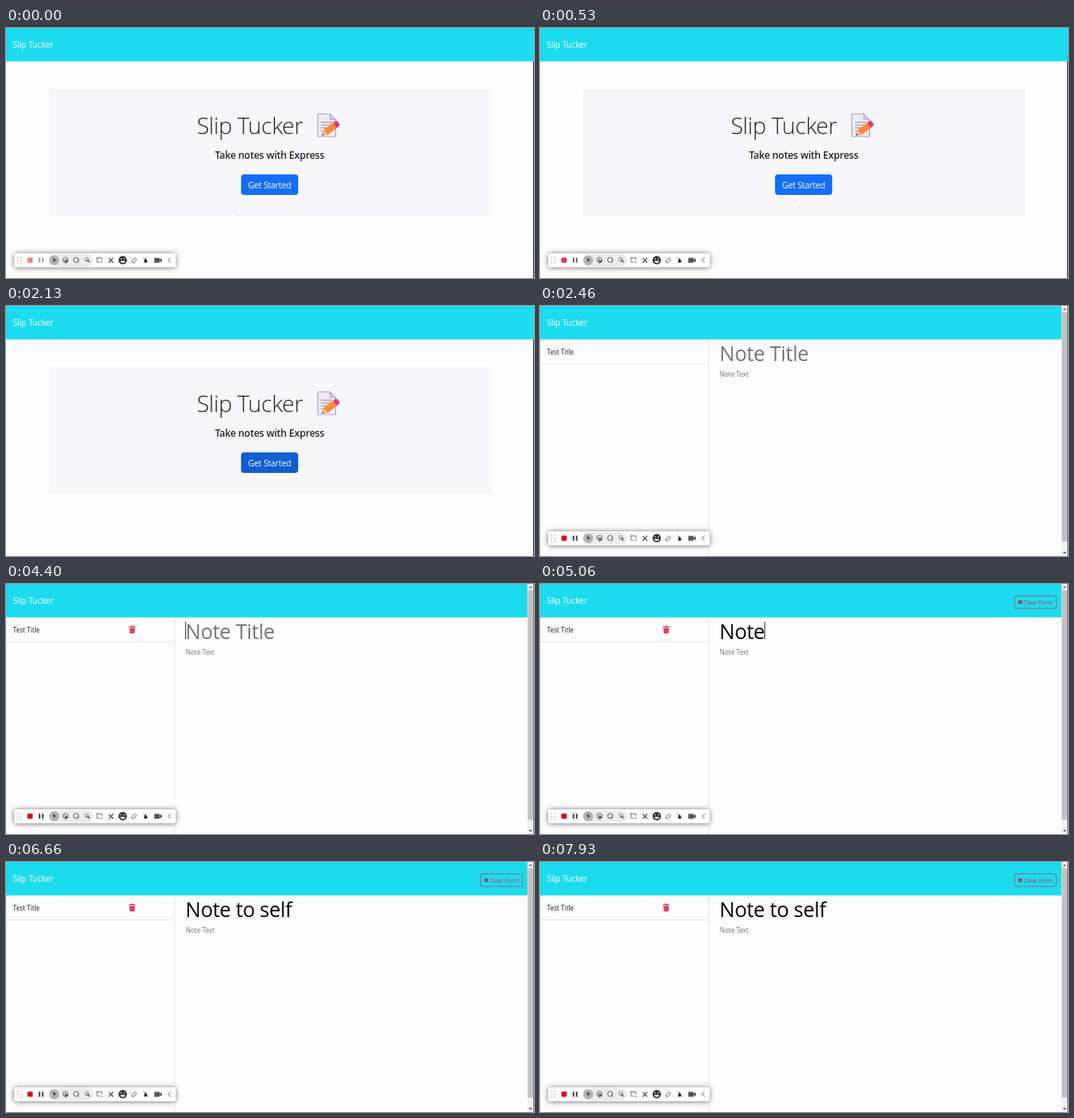
These frames come from a looping animation (640x304 px, 8 s). An HTML page:

```html
<!DOCTYPE html>
<html lang="en">
<head>
<meta charset="utf-8">
<title>Slip Tucker</title>
<style>
html, body { margin: 0; width: 100%; height: 100%; overflow: hidden; background: #fdfdfd; }
svg { display: block; width: 100vw; height: 100vh; }
text { font-family: "Open Sans", "Noto Sans", sans-serif; letter-spacing: -.013em; white-space: pre; }
.line { fill: none; stroke: #444; stroke-width: .8; stroke-linecap: round; stroke-linejoin: round; }
</style>
</head>
<body>
<svg viewBox="0 0 640 304">
  <defs>
    <filter id="shadow" x="-10%" y="-100%" width="120%" height="300%">
      <feDropShadow dx="0" dy="0.5" stdDeviation="3" flood-opacity=".6"/>
    </filter>
  </defs>
  <rect width="640" height="304" fill="#fdfdfd"/>
  <rect width="640" height="40.6" fill="#1cdbef"/>
  <text x="8.3" y="24.4" font-size="10.15" fill="#fff">Slip Tucker</text>

  <g id="home">
    <rect id="hero" x="51.7" y="74" width="536.2" height="154" fill="#f7f7fb"/>
    <text x="295.5" y="129.3" font-size="27.7" font-weight="300" text-anchor="middle" fill="#212529">Slip Tucker</text>
    <g stroke-linejoin="round">
      <path d="M378 104.5h14.5l7 7v20.5h-21.5z" fill="#f0ecf6" stroke="#b0a5bc" stroke-width="1.2"/>
      <path d="M392.5 104.5v7h7z" fill="#d5cddf" stroke="#b0a5bc" stroke-width=".8"/>
      <path d="M381.5 114.5h14m-14 3.5h13m-13 3.5h8m-8 3.5h4" stroke="#9a8fa8"/>
      <path d="M383 130.5l2-6.6 12.4-9.3 4.7 6.2-12.6 9.3z" fill="#ff8a34"/>
      <path d="M383 130.5l2-6.6 4.5 6.2z" fill="#fbc08c"/>
      <path d="M383 130.5l.8-2.4 1.6 2.2z" fill="#444"/>
      <path d="M396.6 115.2l2.8-2.1q1.4-1 2.4.4l2.4 3.2q1 1.4-.4 2.4l-2.8 2.1z" fill="#e8317c"/>
    </g>
    <text x="319.5" y="159" font-size="11.85" font-weight="600" text-anchor="middle" fill="#212529">Take notes with Express</text>
    <rect id="start" x="284.9" y="178" width="69.3" height="25" rx="3.7"/>
    <text x="319.5" y="194.6" font-size="10.15" text-anchor="middle" fill="#fff">Get Started</text>
    <path id="mouse" d="M0 0v3l1-.8z" fill="#999"/>
    <rect x="639" y="40.6" width="1" height="264" fill="#333"/>
  </g>

  <g id="notes">
    <path d="M.5 41v263M204.5 41v263M0 70.3h204.5" stroke="#e3e4e6" stroke-width=".9"/>
    <text x="8.5" y="58.9" font-size="8.15" fill="#212529">Test Title</text>
    <path id="trash" d="M149 51.6h2.4l.6-.8h2l.6.8h2.4v1.2h-8zm.6 1.8h6.8l-.5 6.7h-5.8zm1.6 1v4.7m1.8-4.7v4.7m1.8-4.7v4.7" fill="#d3304c" stroke="#f0a0ac" stroke-width=".35"/>
    <text id="title" x="217.6" y="66.8" font-size="24.7"></text>
    <rect id="caret" y="46" width=".9" height="21" fill="#222"/>
    <text x="217.8" y="86" font-size="8.15" fill="#757575">Note Text</text>
    <g id="clear">
      <rect x="575.3" y="14.3" width="50.6" height="15.4" rx="2" fill="none" stroke="#a8505f" stroke-width=".8"/>
      <path d="M580.2 20.1l4 4m0-4l-4 4" stroke="#b52b40" stroke-width="1.7"/>
      <text x="586.2" y="25" font-size="7.05" fill="#c5334a">Clear Form</text>
    </g>
    <rect x="632" width="8" height="304" fill="#f1f1f1"/>
    <rect x="632.5" y="7.5" width="6.5" height="279" fill="#c1c1c1"/>
    <path d="M633.8 4.8l2-2.4 2 2.4zM633.8 299l2 2.4 2-2.4z" fill="#555"/>
    <rect x="639.3" width=".7" height="304" fill="#555"/>
  </g>

  <g id="bar">
    <rect x="10" y="274" width="195.5" height="16.8" rx="2.5" fill="#fff" filter="url(#shadow)"/>
    <path d="M14 279h0m4 0h0m-4 3.5h0m4 0h0m-4 3.5h0m4 0h0" stroke="#999" stroke-width="1.4" stroke-linecap="round"/>
    <g id="rec">
      <rect x="26" y="279.2" width="6.4" height="6.4" rx=".8" fill="#e0001b"/>
      <path d="M40.6 279.2v6.4m3.9 0v-6.4" stroke="#333" stroke-width="1.8"/>
    </g>
    <rect x="52.3" y="276" width="52.6" height="12.8" rx="6.4" fill="#ededed" stroke="#d2d2d2" stroke-width=".6"/>
    <circle cx="58.5" cy="282.4" r="6" fill="#b4b4b4"/>
    <path d="M56.4 279l5 3.6-2.2.4-.9 2.3z" fill="#444"/>
    <g class="line">
      <circle cx="72" cy="282" r="3.1"/><path d="M71.2 281.2l4.2 3-2 .4-.8 1.6z" fill="#444" stroke-width=".4"/>
      <circle cx="85" cy="282" r="3.1"/><path d="M86.3 284l1.6 1.4"/>
      <circle cx="98" cy="281.6" r="2.4" stroke-dasharray="1 1.2"/><path d="M98.3 282l2.8 2.8" stroke-width="1.2"/>
      <path d="M110.3 279.5h5.8v3m-5.8-3v5.2h3" stroke-dasharray="1.2 1"/><path d="M115 285h1.8"/>
      <path d="M125 285l4.6-5.2m-4.6.4l1.4 1.4m1.6 1.7l1.7 1.7" stroke-width="1.2"/>
      <path d="M152.6 283.5l3.6-4 2.2 2-3.5 3.8h-1.2z"/>
      <path d="M167 279.4l4.4 5.4"/>
      <path d="M199.2 279.6l-2.6 2.7 2.6 2.7"/>
    </g>
    <circle cx="141.5" cy="282.3" r="5.1" fill="#333"/>
    <path d="M139.6 280.8h0m3.8 0h0" stroke="#fff" stroke-width="1.5" stroke-linecap="round"/>
    <path d="M138.7 283.2h5.6a2.8 2.4 0 0 1-5.6 0z" fill="#fff"/>
    <path d="M169.2 280q4 5.4 0 5.4t0-5.4z" fill="#222"/>
    <path d="M179.7 279.5h6.5v2l2.6-1.6v5.2l-2.6-1.6v2h-6.5z" fill="#555"/>
  </g>
</svg>
<script>
const el = id => document.getElementById(id);
const show = (id, on) => el(id).style.display = on ? "" : "none";
const ramp = (t, a, b) => Math.min(1, Math.max(0, (t - a) / (b - a)));
const mix = (a, b, k) => `rgb(${a.map((v, i) => Math.round(v + (b[i] - v) * k))})`;

const phrase = "Note to self";
const keys = [4600, 4860, 5000, 5060, 5200, 5260, 5330, 5600, 5730, 5860, 6000, 6130];
const blinks = [3330, 3860, 4400, 6660, 7200, 7730];

function draw(t) {
  const home = t < 2260;
  show("home", home);
  show("notes", !home);
  show("bar", t < 2000 || t >= 2460);
  el("rec").style.opacity = .5 + .5 * ramp(t, 130, 800);

  if (home) {
    const move = ramp(t, 130, 930);
    el("start").style.fill = mix([20, 110, 250], [17, 94, 208], ramp(t, 700, 850));
    el("hero").style.fill = mix([247, 247, 251], [247, 247, 249], t < 1860 ? move : 0);
    el("mouse").setAttribute("transform", `translate(${280.5 + 56 * move} ${225 - 35 * move})`);
    show("mouse", t < 1860);
    return;
  }

  const typed = phrase.slice(0, keys.filter(k => t >= k).length);
  const title = el("title");
  title.textContent = typed || "Note Title";
  title.style.fill = typed ? "#000" : "#757575";
  el("caret").setAttribute("x", 217.3 + (typed ? title.getComputedTextLength() : 0));
  show("caret", blinks.filter(b => t >= b).length % 2);
  show("trash", t >= 2530);
  show("clear", typed);
}

function tick() {
  draw(performance.now() % 8000);
  requestAnimationFrame(tick);
}
tick();
</script>
</body>
</html>
```
